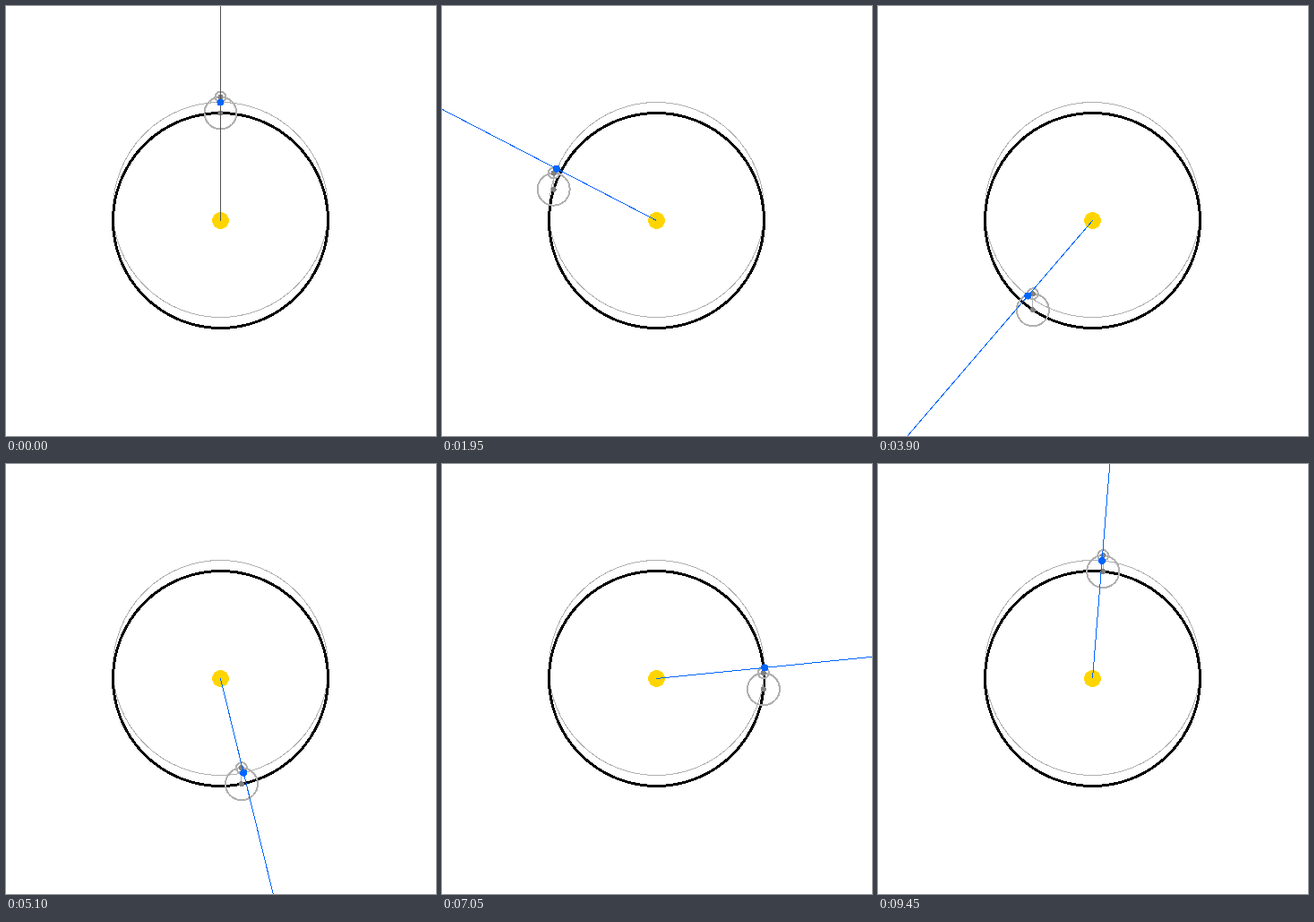
Recreate the animation shown at these times as an HTML page. Size 480x480 px, loop 9600 ms.

```html
<!DOCTYPE html>
<html lang="en">
<head>
<meta charset="utf-8">
<title>Epicycle model</title>
<style>
  html, body { margin: 0; width: 100%; height: 100%; overflow: hidden; background: #fff; }
  svg { display: block; width: 480px; height: 480px; shape-rendering: crispEdges; }
  .ring { fill: none; stroke: #b0b0b0; }
  .dot { fill: #808080; }
</style>
</head>
<body>
<svg viewBox="0 0 480 480">
  <g transform="translate(239.5 239.5)">
    <circle class="ring" cy="-12" r="120"/>
    <circle r="120" fill="none" stroke="#000" stroke-width="3"/>
    <circle r="9.5" fill="#ffd500"/>
    <g id="epicycle">
      <circle class="ring" r="18" stroke-width="2"/>
      <circle class="ring" cy="-18" r="6" stroke-width="2"/>
      <path class="ring" d="M0 0V-18"/>
      <circle class="dot" r="3"/>
      <circle class="dot" cy="-18" r="3"/>
    </g>
    <line id="sight"/>
    <circle id="planet" r="4" fill="#06f"/>
  </g>
</svg>
<script>
  const STEPS = 64, STEP_MS = 150;
  const DEFERENT = 120, EPICYCLE = 18, EPICYCLET = 6, REACH = 400;
  const [epicycle, sight, planet] =
    ['epicycle', 'sight', 'planet'].map(id => document.getElementById(id));
  const move = (el, x, y) => el.setAttribute('transform', `translate(${x} ${y})`);

  function draw(step) {
    const angle = step / STEPS * 2 * Math.PI;
    const cx = -DEFERENT * Math.sin(angle);
    const cy = -DEFERENT * Math.cos(angle);
    // The small circle turns twice as fast as the deferent.
    const px = cx + EPICYCLET * Math.sin(2 * angle);
    const py = cy - EPICYCLE + EPICYCLET * Math.cos(2 * angle);
    const scale = REACH / Math.hypot(px, py);

    move(epicycle, cx, cy);
    move(planet, px, py);
    sight.setAttribute('x2', px * scale);
    sight.setAttribute('y2', py * scale);
    sight.setAttribute('stroke', step === 0 ? '#505050' : '#06f');
  }

  const start = performance.now();
  function tick() {
    draw(Math.floor((performance.now() - start) / STEP_MS) % STEPS);
    requestAnimationFrame(tick);
  }
  tick();
</script>
</body>
</html>
```
